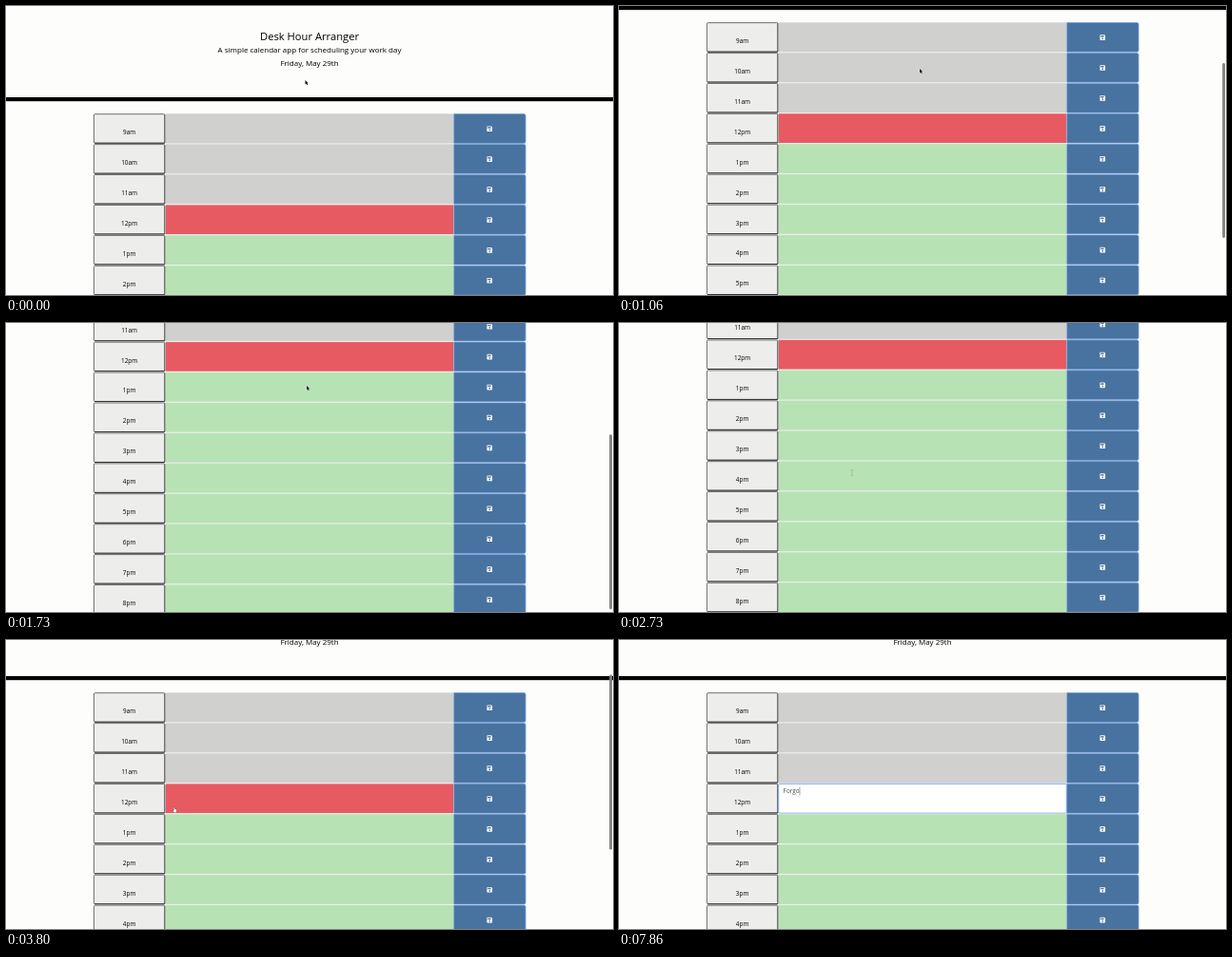
An HTML page with a canvas for the animation above (8000 ms loop, 638 px wide and 304 px high).

```html
<!DOCTYPE html>
<html lang="en">
<head>
<meta charset="utf-8">
<title>Day planner</title>
<style>
  html, body { margin: 0; width: 100%; height: 100%; overflow: hidden; background: #fdfdfb; }
  canvas { display: block; }
</style>
</head>
<body>
<canvas id="stage" width="638" height="304"></canvas>
<script>
const ctx = document.getElementById('stage').getContext('2d');
const LOOP = 8000, STEP = 1000 / 15;
const W = 638, H = 304, MAX_SCROLL = 191.5, REST_SCROLL = 58;
const ROW_TOP = 113.3, ROW_PITCH = 31.92, ROW_H = 31.3;
const HOURS = ['9am', '10am', '11am', '12pm', '1pm', '2pm', '3pm', '4pm', '5pm', '6pm', '7pm', '8pm'];
const NOW = 3;
const PAST = '#d0d0ce', PRESENT = '#e85a62', FUTURE = '#b7e3b4', BLUE = '#4873a0';
const ENTRY = 'Forgo', FOCUS_AT = 6050, TYPE_AT = 7195, KEY_GAP = 2.5 * STEP;

// Pointer trips after the initial rest position.
const TRIPS = [
  { from: 0, to: 130, x: 316, y: 66 },
  { from: 2260, to: 2700, x: 245, y: 157.5 },
  { from: 2760, to: 3060, x: 177, y: 176 },
  { from: 4000, to: 4900, x: 195, y: 163 },
];

const progress = (t, from, to) => Math.min(1, Math.max(0, (t - from) / (to - from)));

function ease(t, from, to) {
  const u = progress(t, from, to);
  return u * u * (3 - 2 * u);
}

const scrollAt = t =>
  MAX_SCROLL * ease(t, 300, 1830) - (MAX_SCROLL - REST_SCROLL) * ease(t, 3060, 3780);

const barAlpha = (t, shown, fading) => t < shown ? 0 : 1 - progress(t, fading, fading + 300);

function pointerAt(t) {
  return TRIPS.reduce((p, trip) => {
    const e = ease(t, trip.from, trip.to);
    return { x: p.x + (trip.x - p.x) * e, y: p.y + (trip.y - p.y) * e };
  }, { x: 314.5, y: 78 });
}

function rect(x, y, w, h, color) {
  ctx.fillStyle = color;
  ctx.fillRect(x, y, w, h);
}

function box(x, y, w, h, radii, fill, stroke, lineWidth = 0.8) {
  ctx.beginPath();
  ctx.roundRect(x, y, w, h, radii);
  if (fill) { ctx.fillStyle = fill; ctx.fill(); }
  if (stroke) { ctx.strokeStyle = stroke; ctx.lineWidth = lineWidth; ctx.stroke(); }
}

function shape(path, fill, stroke) {
  const p = new Path2D(path);
  ctx.lineWidth = 0.7;
  ctx.lineJoin = 'round';
  if (stroke) { ctx.strokeStyle = stroke; ctx.stroke(p); }
  ctx.fillStyle = fill;
  ctx.fill(p);
}

function text(str, x, y, size, color = '#000', align = 'center') {
  ctx.font = `${size}px "Open Sans", sans-serif`;
  ctx.textAlign = align;
  ctx.fillStyle = color;
  ctx.fillText(str, x, y);
}

function saveIcon(x, y) {
  box(x - 2.8, y - 2.8, 5.6, 5.6, [0.6, 1.4, 0.6, 0.6], '#fff');
  rect(x - 2, y - 2, 3.3, 1.5, BLUE);
  ctx.beginPath();
  ctx.arc(x, y + 1.1, 0.85, 0, 7);
  ctx.fill();
}

function drawRow(label, i, t) {
  const y = ROW_TOP + i * ROW_PITCH;
  const focused = i === NOW && t >= FOCUS_AT;
  const fill = focused ? '#fff' : i < NOW ? PAST : i === NOW ? PRESENT : FUTURE;

  box(92.4, y + 0.4, 74.6, ROW_H - 0.8, 1.2, '#ededec', '#4c4c4c');
  rect(93, y + ROW_H - 0.8, 74, 0.8, '#222');
  rect(166.6, y + 1, 0.8, ROW_H - 1.5, '#222');
  text(label, 129.6, y + 21.8, 6.4);

  rect(167.6, y - 0.3, 303, ROW_PITCH, '#e9ece8');
  rect(168, y + 0.3, 302.3, ROW_H - 0.6, fill);

  box(470.8, y + 0.3, 75.3, ROW_H - 0.5, [0, 1.6, 1.6, 0], BLUE, '#6f9cdc', 0.7);
  saveIcon(508.3, y + 15.9);

  if (focused) drawEditor(y, t);
}

function drawEditor(y, t) {
  ctx.globalAlpha = progress(t, FOCUS_AT + 30, FOCUS_AT + 250);
  box(167.7, y + 0.2, 302.6, ROW_H - 0.4, 1, null, '#7eaae6', 1);
  ctx.globalAlpha = 1;

  const typed = ENTRY.slice(0, Math.max(0, Math.floor((t - TYPE_AT) / KEY_GAP) + 1));
  text(typed, 172.6, y + 10.3, 6.4, '#495057', 'left');
  const caretOn = t < 6595 || t >= 7055;
  if (caretOn) rect(172.6 + ctx.measureText(typed).width, y + 3.6, 0.6, 8.6, '#666');
}

function drawPointer(t) {
  if (t >= TYPE_AT) return;
  const { x, y } = pointerAt(t);
  ctx.save();
  ctx.translate(x, y);
  if (t < 2250) {
    shape('M0 0V4.6L1.1 3.7 1.9 5.3 2.7 4.9 2 3.3H3.3Z', '#111', '#fff');
  } else if (t > 2900 && t < 4100) {
    shape('M-.6 0H.3L.6 2 2.4 2.5V4L1.8 5.5H-.4L-1.8 3.2H-.5Z', '#fff', '#222');
  } else {
    ctx.globalAlpha = 0.45;
    shape('M-.3-2.4H.3V2.4H-.3ZM-1.2-3H1.2V-2.4H-1.2ZM-1.2 2.4H1.2V3H-1.2Z', '#555');
  }
  ctx.restore();
}

function draw(t) {
  const scroll = scrollAt(t);
  rect(0, 0, W, H, '#fdfdfb');

  ctx.save();
  ctx.translate(0, -scroll);
  text('Desk Hour Arranger', 319, 36.4, 11.2);
  text('A simple calendar app for scheduling your work day', 319, 48.6, 8);
  text('Friday, May 29th', 319, 63, 8);
  rect(0, 96, W, 4.2, '#000');
  HOURS.forEach((label, i) => drawRow(label, i, t));
  ctx.restore();

  ctx.globalAlpha = barAlpha(t, 330, 2200) + barAlpha(t, 3060, 4350);
  box(634.2, 1 + scroll * 0.614, 2.8, 184, 1.4, '#808080');
  ctx.globalAlpha = 1;
  drawPointer(t);
}

const start = performance.now();
function frame() {
  const t = (performance.now() - start) % LOOP;
  draw(Math.floor((t + 7) / STEP) * STEP % LOOP);
  requestAnimationFrame(frame);
}
frame();
</script>
</body>
</html>
```
